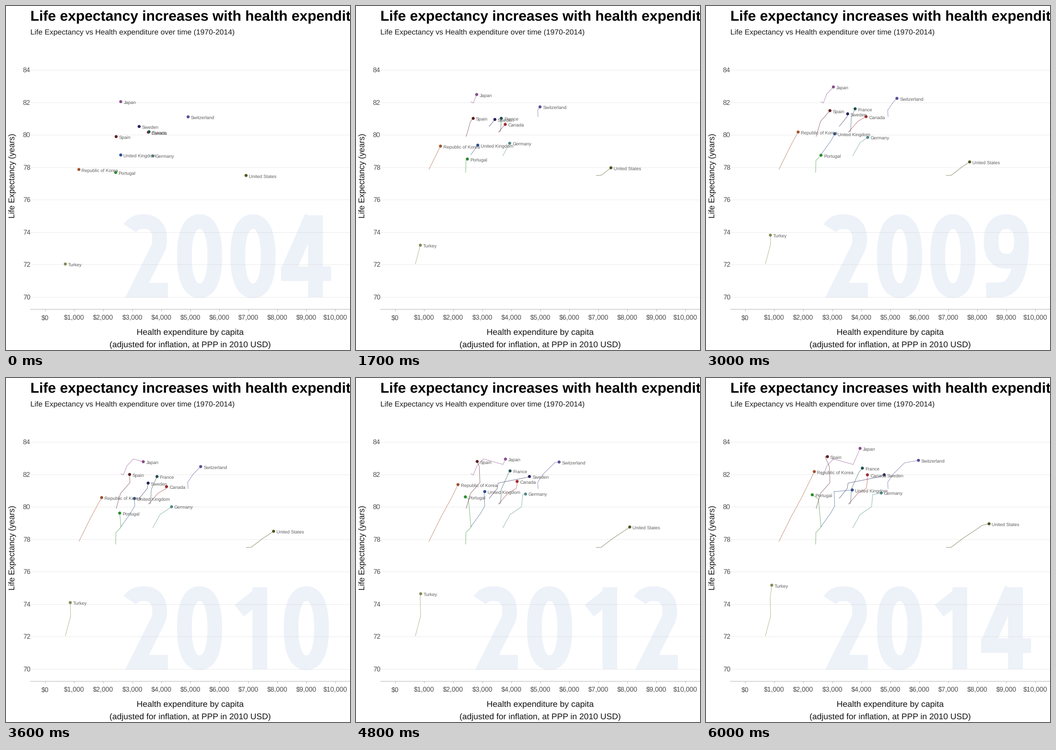
A matplotlib script for the animation above (8100 ms loop, 748x748 px).

```python
import matplotlib.pyplot as plt
import numpy as np
from matplotlib.animation import FuncAnimation
from matplotlib.collections import LineCollection

SIZE = 748
DPI = 72  # one point equals one pixel
STEP_MS = 100
FRAMES = 81
FIRST_YEAR, LAST_STATE = 2004, 10
HOLD, CYCLE = 4, 6  # frames at rest, frames from one year to the next
YEAR_COLOR = "#edf2f9"
YEAR_TOP, YEAR_CENTER, DIGIT_STEP = 453, 305, 116

plt.rcParams["font.family"] = "Liberation Sans"
plt.rcParams["text.hinting"] = "none"

fig = plt.figure(figsize=(SIZE / DPI, SIZE / DPI), dpi=DPI, facecolor="white")
ax = fig.add_axes([0, 0, 1, 1])
ax.axis("off")


# ---- country tracks: a few turning points, straight in between ----
names, colors, tracks = [], [], []


def track(name, color, *keys):
    """Each key is (years since the start, x, y) on the stage."""
    years, xs, ys = zip(*keys)
    states = np.arange(LAST_STATE + 1)
    names.append(name)
    colors.append(color)
    tracks.append(np.column_stack([np.interp(states, years, xs),
                                   np.interp(states, years, ys)]))


track("Canada", "#a02c30", (0, 309.5, 274.5), (4, 330.5, 250.5),
      (5, 348, 240.5), (7, 350, 232), (10, 351, 210.5))
track("France", "#20504f", (0, 311, 273.5), (1, 314.5, 272),
      (3, 316, 242), (7, 332.5, 205), (10, 340, 196))
track("Germany", "#4f8a88", (0, 319, 326), (3, 335, 297),
      (6, 360, 280), (7, 362.5, 253.5), (10, 381, 250))
track("Japan", "#8a4d8c", (0, 249.5, 208), (1, 255, 211), (3, 263, 191),
      (5, 277, 176), (7, 320, 188), (10, 335, 153))
track("Portugal", "#2c8c2c", (0, 238.5, 362), (2, 239, 336),
      (5, 250, 324.5), (7, 244.5, 263), (9, 231, 254))
track("Republic of Korea", "#a0532f", (0, 158.5, 355.5), (3, 185, 302),
      (6, 208, 260), (10, 235.5, 203.5))
track("Spain", "#5c2226", (0, 239.5, 284), (2, 249, 251), (5, 269.5, 227.5),
      (7, 268, 192), (9, 259, 171), (10, 264, 171))
track("Sweden", "#27235c", (0, 289.5, 262), (4, 307, 240.5),
      (6, 309, 228.5), (7, 372, 216), (10, 387.5, 210.5))
track("Switzerland", "#584f98", (0, 396, 241), (2, 395, 227),
      (4, 407, 209), (7, 431.5, 184.5), (10, 462, 179))
track("Turkey", "#868a52", (0, 129, 561), (3, 140.5, 518),
      (7, 139.5, 478.5), (10, 143, 450.5))
track("United Kingdom", "#2b4d8c", (0, 249.5, 324), (4, 271, 294),
      (5, 280, 278), (7, 278.5, 246), (8, 280, 247), (9, 318, 243.5))
track("United States", "#4f5522", (0, 522, 368.5), (1, 533.5, 368),
      (3, 556, 350.5), (7, 590.5, 327.5), (9, 600, 320.5), (10, 615.5, 317))


# ---- digits of the large year, built from thick arcs and lines ----
def arc(cx, cy, rx, ry, start=0, end=360):
    """Slightly squared elliptic arc; angles in degrees, clockwise."""
    a = np.radians(np.linspace(start, end, 73))
    c, s = np.cos(a), np.sin(a)
    return np.column_stack([cx + rx * np.sign(c) * abs(c) ** 0.85,
                            cy + ry * np.sign(s) * abs(s) ** 0.85])


def join(*parts):
    """One stroke from single points and arcs."""
    return np.vstack([np.atleast_2d(part) for part in parts])


SIX = [arc(0, 123, 33, 43),
       join(arc(14, 123, 47, 105, 180, 270), (44, 17))]

# x is measured from the middle of the digit, y from its top
DIGITS = {
    "0": [arc(0, 91, 33, 75)],
    "1": [join((15.5, 2), (15.5, 180)), join((-30, 53), (12, 20))],
    "2": [join(arc(-6, 54, 35, 38, 215, 390), (-20, 165), (47, 165))],
    "3": [join(arc(-8, 50, 33, 34, 215, 450), (-22, 84)),
          join((-22, 84), arc(-4, 125, 34, 41, 270, 470), (-50, 158))],
    "4": [join((20.5, 2), (20.5, 180)), join((-55, 129), (54, 129)),
          join((12, 5), (-39, 122))],
    "5": [join((40, 17), (-24, 17), (-29, 84),
               arc(-4, 124, 35, 42, 255, 470), (-47, 158))],
    "6": SIX,
    "7": [join((-48, 17), (29, 17), (-19, 177))],
    "8": [arc(-1, 48, 30, 32), arc(-1, 130, 33, 36)],
    "9": [[0, 182] - stroke for stroke in SIX],
}


def year_strokes(year):
    return [stroke + [YEAR_CENTER + n * DIGIT_STEP, YEAR_TOP]
            for n, digit in enumerate(str(year)) for stroke in DIGITS[digit]]


# ---- fixed chart parts ----
def text(x, y, s, size, color="black", **kw):
    return ax.text(x, y, s, size=size, color=color, **kw)


def line(x, y, color="#b3b3b3", **kw):
    ax.plot(x, y, color=color, lw=1, zorder=1, **kw)


text(53, 32, "Life expectancy increases with health expenditure", 31.2,
     weight="bold")
text(53, 62, "Life Expectancy vs Health expenditure over time (1970-2014)",
     16.4, "#1a1a1a")
text(400.5, 714, "Health expenditure by capita", 18.4, "#111111", ha="center")
text(400.5, 741, "(adjusted for inflation, at PPP in 2010 USD)", 18.2,
     "#111111", ha="center")
text(14, 368.5, "Life Expectancy (years)", 17.6, "#111111", rotation=90,
     ha="center", va="center")

for n in range(8):
    y = np.floor(138.5 + n * 70.57) + 0.5
    line([55, SIZE], [y, y], "#c0c0c0", dashes=(1, 2), dash_capstyle="butt")
    text(53, y + 5.5, str(84 - 2 * n), 14.5, "#4d4d4d", ha="right")

line([53, SIZE], [658.5, 658.5])
for n in range(11):
    x = 85.3 + n * 63.1
    line([x, x], [659, 663])
    text(x, 682.5, f"${n * 1000:,}", 14.5, "#4d4d4d", ha="center")

# ---- moving parts ----
year_lines = LineCollection([], colors=YEAR_COLOR, linewidths=32,
                            capstyle="butt", joinstyle="miter", zorder=0)
trails = LineCollection([], colors=colors, linewidths=0.9, alpha=0.7, zorder=2)
for part in (year_lines, trails):
    ax.add_collection(part, autolim=False)
starts = np.array([pts[0] for pts in tracks])
dots = ax.scatter(starts[:, 0], starts[:, 1], s=6.6 ** 2, c=colors,
                  linewidths=0, zorder=3)
labels = [text(0, 0, name, 9.95, "#606060", zorder=4) for name in names]
ax.set(xlim=(0, SIZE), ylim=(SIZE, 0))


def cubic_in_out(t):
    return 4 * t ** 3 if t < 0.5 else 1 - 4 * (1 - t) ** 3


def update(i):
    state, step = divmod(i, CYCLE)
    moving = step >= HOLD and state < LAST_STATE
    state = min(state, LAST_STATE)
    blend = cubic_in_out((step - HOLD + 1) / 3) if moving else 0

    heads, paths = [], []
    for pts in tracks:
        target = pts[min(state + 1, LAST_STATE)]
        head = pts[state] + blend * (target - pts[state])
        heads.append(head)
        paths.append(np.vstack([pts[:state + 1], head]))
    trails.set_segments(paths)
    dots.set_offsets(heads)
    for label, (x, y) in zip(labels, heads):
        label.set_position((x + 6, y + 5))

    # the year is hidden while the points travel
    year_lines.set_segments([] if moving else year_strokes(FIRST_YEAR + state))
    return [trails, dots, year_lines, *labels]


anim = FuncAnimation(fig, update, frames=FRAMES, interval=STEP_MS,
                     repeat=True, repeat_delay=0, blit=False)
plt.show()
```
